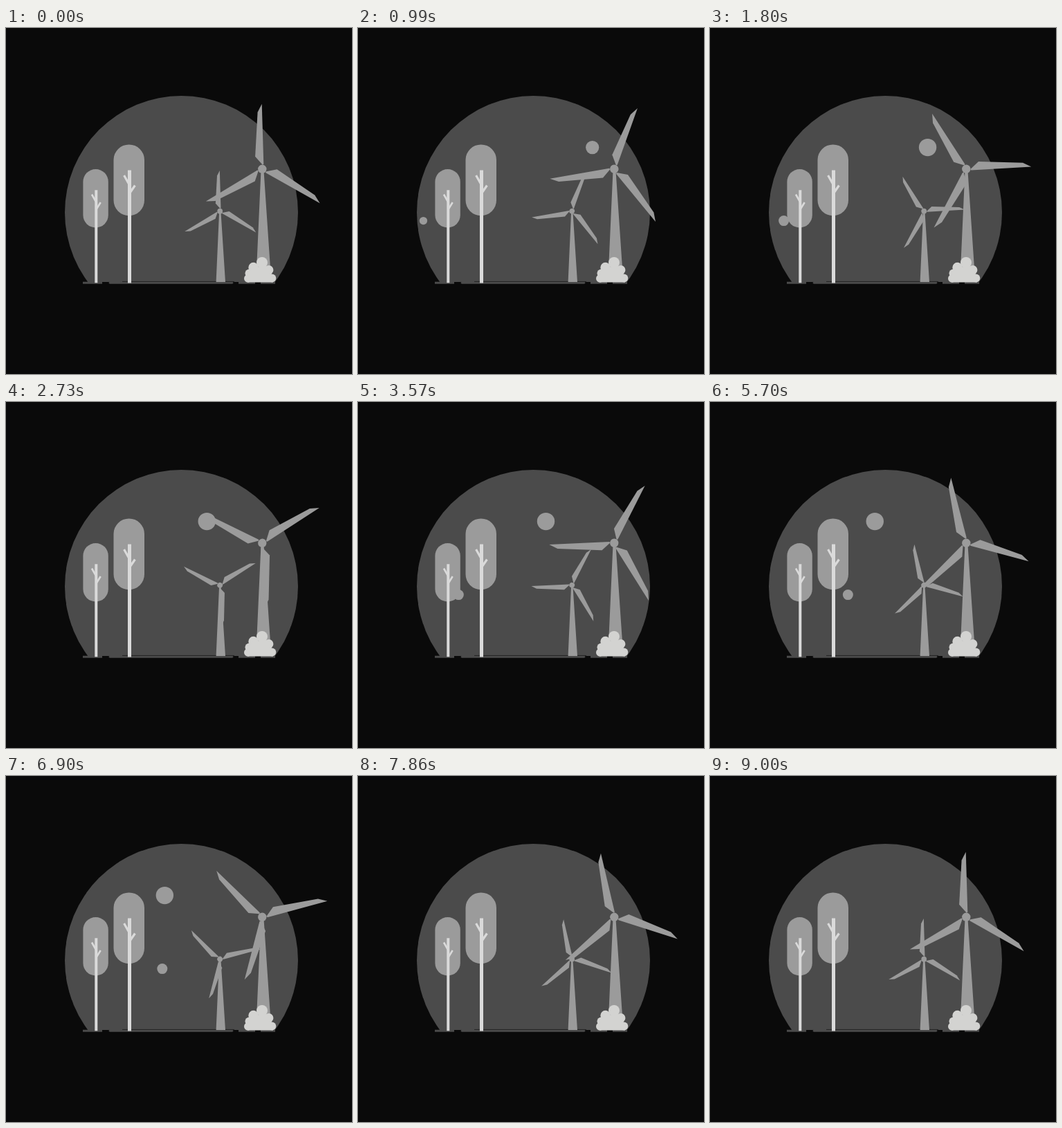
These frames come from a looping animation (500 by 500 pixels, 9030 ms). An HTML page:

```html
<!DOCTYPE html>
<html>
<head>
<meta charset="utf-8">
<style>
  html, body { margin: 0; height: 100%; overflow: hidden; background: #0a0a0a; }
  svg { display: block; width: 100vw; height: 100vh; }
</style>
</head>
<body>
<svg viewBox="0 0 500 500">
  <defs>
    <clipPath id="horizon"><rect width="500" height="367"/></clipPath>
    <path id="blade" d="M-.6-94L-6.7-82L-10.2-18L.5-6L2-7Z"/>
    <g id="rotor">
      <use href="#blade"/>
      <use href="#blade" transform="rotate(121) scale(1.03)"/>
      <use href="#blade" transform="rotate(240.5)"/>
      <circle r="6.2"/>
    </g>
  </defs>

  <g fill="#4b4b4b">
    <circle cx="253.5" cy="266.5" r="168.5" clip-path="url(#horizon)"/>
    <path d="M111 366.8h28v3h-28zM150 366.8H327q3 1.5 0 3H150q-3-1.5 0-3zM336 366.8h24v3h-24zM368 366.8h21v3h-21z"/>
  </g>
  <path d="M168 366.4H330" stroke="#181818" stroke-width=".8"/>

  <g fill="#9b9b9b">
    <circle id="bigBall" cy="172.6"/>
    <circle id="smallBall" cy="278.6"/>
    <rect x="111.4" y="204" width="36.4" height="84.5" rx="18.2"/>
    <rect x="155.5" y="168.4" width="44.5" height="102.8" rx="22.2"/>
    <path d="M308 268h2.6L317 367h-13.4zM368.4 208h4.2L383.3 366h-22z"/>
    <g transform="translate(309.2 264.7) scale(.625)"><use id="smallRotor" href="#rotor"/></g>
    <g transform="translate(370.3 203.8)"><use id="bigRotor" href="#rotor"/></g>
  </g>

  <g fill="none" stroke="#dadada">
    <path stroke-width="4" d="M130.3 234.3V368.3"/>
    <path stroke-width="2.6" d="M124 240.5L130.5 252M136.7 252L130.5 262"/>
    <path stroke-width="5" d="M178.5 205.5V368.5"/>
    <path stroke-width="3.2" d="M170.6 213L178.5 227M186.4 227.5L178.5 239"/>
  </g>

  <g fill="#d3d3d1">
    <circle cx="370" cy="339" r="8"/>
    <circle cx="357.5" cy="346" r="7.2"/>
    <circle cx="379.8" cy="349.7" r="6.6"/>
    <circle cx="351.5" cy="354.5" r="6"/>
    <circle cx="384.3" cy="361.5" r="6"/>
    <circle cx="349.7" cy="362" r="5.7"/>
    <path d="M357 346L378 344L386 360V367.5H349L351 354Z"/>
  </g>
</svg>
<script>
const LOOP = 9030, SPIN = 9000, TURNS = 4;
const $ = id => document.getElementById(id);
const clamp = v => Math.min(1, Math.max(0, v));

// Cubic Bezier easing with handles (a, 0) and (b, 1)
function ease(x, a, b) {
  let lo = 0, hi = 1;
  for (let i = 0; i < 30; i++) {
    const s = (lo + hi) / 2, r = 1 - s;
    if (3 * a * s * r * r + 3 * b * s * s * r + s ** 3 < x) lo = s; else hi = s;
  }
  return lo * lo * (3 - 2 * lo);
}

// Scale that pops in with an overshoot and shrinks away
function pop(t, start, end) {
  const p = clamp((t - start) / 500) - 1;
  const grow = 1 + 3.5 * p ** 3 + 2.5 * p * p;
  const shrink = clamp((end - t) / 350);
  return Math.max(0, grow) * shrink * shrink * (3 - 2 * shrink);
}

function ball(id, x, r) {
  $(id).setAttribute("cx", x);
  $(id).setAttribute("r", r);
}

function draw(now) {
  const t = now % LOOP, u = (t - 4500) / 1000, v = Math.max(0, 7.5 - t / 1000);
  const turn = `rotate(${360 * TURNS * ease(clamp(t / SPIN), .58, .13)})`;
  $("bigRotor").setAttribute("transform", turn);
  $("smallRotor").setAttribute("transform", turn);
  ball("bigBall", 228 + 3.46 * v ** 1.85, 12.7 * pop(t, 900, 7480));
  ball("smallBall", 169 + 25.8 * u - .37 * u ** 3, 7.5 * pop(t, 900, 7800));
}

const began = performance.now();
function tick() {
  draw(performance.now() - began);
  requestAnimationFrame(tick);
}
tick();
</script>
</body>
</html>
```
